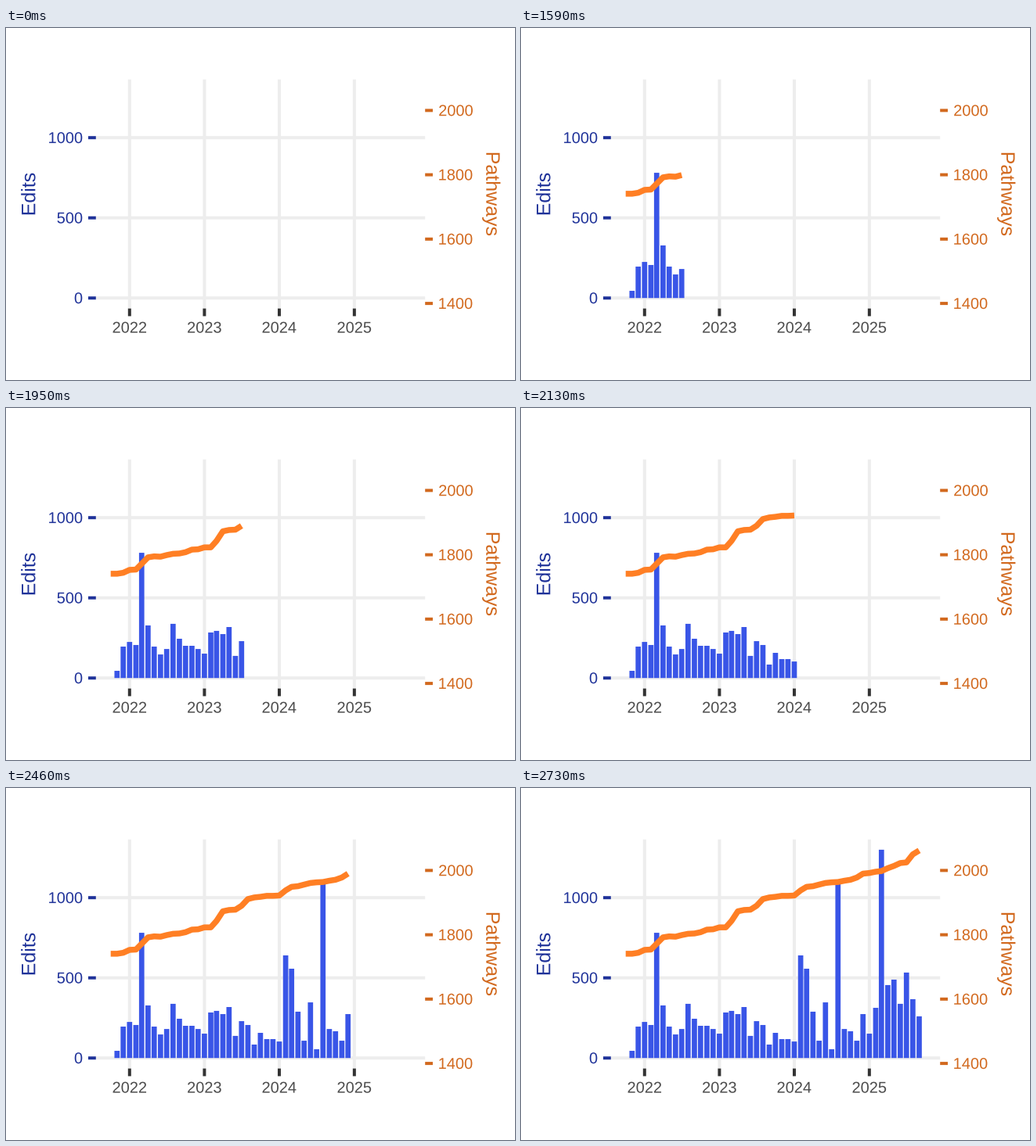
Animation of 650 by 450 pixels, one loop 2.76 s. Source, as a matplotlib script:

```python
import numpy as np
import matplotlib as mpl
import matplotlib.pyplot as plt
from matplotlib.animation import FuncAnimation
from matplotlib.patches import PathPatch, Rectangle
from matplotlib.textpath import TextPath
from matplotlib.transforms import Affine2D

W, H, DPI = 650, 450, 100
PX = 72 / DPI                       # points per pixel
STEP_MS, FRAMES, HOLD = 30, 92, 45  # empty chart is held for HOLD frames
LEFT, RIGHT, TOP, BOTTOM = 114.8, 535.2, 65.8, 358.6
TICK = 9.8

GRID, DARK, GREY = "#ededed", "#333333", "#4d4d4d"
BAR, BAR_AXIS = "#3955e7", "#1f3299"
LINE, LINE_AXIS = "#ff7f24", "#d2691e"

mpl.rcParams["font.family"] = "Liberation Sans"

# Monthly edits from November 2021, monthly pathway totals from October 2021
edits = [45, 196,
         225, 206, 781, 328, 196, 147, 181, 338, 245, 201, 201, 181,
         152, 284, 294, 274, 318, 138, 230, 206, 84, 157, 118, 118,
         103, 640, 557, 289, 108, 347, 55, 1089, 181, 167, 108, 274,
         152, 313, 1299, 455, 489, 338, 533, 367, 260]
pathways = [1741, 1741, 1744,
            1753, 1754, 1772, 1792, 1795, 1794, 1799, 1803, 1804, 1808, 1816, 1817,
            1823, 1823, 1843, 1873, 1877, 1878, 1890, 1911, 1916, 1918, 1921, 1921,
            1922, 1938, 1949, 1951, 1956, 1961, 1963, 1964, 1968, 1971, 1978, 1990,
            1992, 1996, 1998, 2007, 2014, 2023, 2025, 2050, 2062]


def date_x(dates):
    days = (dates.astype("datetime64[D]") - np.datetime64("2022-01-01")).astype(int)
    return 157.8 + days * 0.2619


def edits_y(n):
    return 345.2 - 0.205 * np.asarray(n)


def pathways_y(n):
    return 352.1 - 0.4112 * (np.asarray(n) - 1400)


fig = plt.figure(figsize=(W / DPI, H / DPI), dpi=DPI, facecolor="white")
ax = fig.add_axes([0, 0, 1, 1])
ax.set_xlim(0, W)
ax.set_ylim(H, 0)
ax.axis("off")


def stroke(xs, ys, color, width, z):
    line, = ax.plot(xs, ys, color=color, lw=width * PX, zorder=z, snap=False,
                    solid_capstyle="butt", solid_joinstyle="round")
    return line


def label(s, x, y, color, size=20, align=0.5, turn=0):
    """Outline text; x is the baseline for turned text, else the aligned edge."""
    path = TextPath((0, 0), s, size=size)
    box = path.get_extents()
    dx = -(box.x0 + align * box.width)
    dy = 0 if turn else -(box.y0 + box.y1) / 2
    place = Affine2D().translate(dx, dy).scale(1, -1).rotate_deg(turn).translate(x, y)
    ax.add_patch(PathPatch(place.transform_path(path), fc=color, lw=0, zorder=1))


for year in range(2022, 2026):
    x = date_x(np.datetime64(f"{year}-01-01"))
    stroke([x, x], [TOP, BOTTOM], GRID, 4, 0)
    stroke([x, x], [BOTTOM, BOTTOM + TICK], DARK, 4, 1)
    label(str(year), x, 382.7, GREY)

for n in (0, 500, 1000):
    y = edits_y(n)
    stroke([LEFT, RIGHT], [y, y], GRID, 4, 0)
    stroke([LEFT - TICK, LEFT], [y, y], BAR_AXIS, 4, 1)
    label(str(n), 97.3, y, BAR_AXIS, align=1)

for n in (1400, 1600, 1800, 2000):
    y = pathways_y(n)
    stroke([RIGHT, RIGHT + TICK], [y, y], LINE_AXIS, 4, 1)
    label(str(n), 553.2, y, LINE_AXIS, align=0)

label("Edits", 37.3, 212, BAR_AXIS, size=25, turn=-90)
label("Pathways", 613.3, 212.5, LINE_AXIS, size=25, turn=90)

month_x = date_x(np.arange("2021-10", "2025-10", dtype="datetime64[M]"))
total_y = pathways_y(pathways)
BAR_W = 6.7
bars = [ax.add_patch(Rectangle((x - BAR_W / 2, edits_y(n)), BAR_W, 0.205 * n,
                               fc=BAR, lw=0, zorder=2, snap=False))
        for x, n in zip(month_x[1:], edits)]
trend = stroke([], [], LINE, 7.5, 3)


def draw(frame):
    shown = max(0, frame - HOLD + 1)
    for i, bar in enumerate(bars):
        bar.set_visible(i < shown)
    end = shown + 1 if shown else 0
    trend.set_data(month_x[:end], total_y[:end])
    return [*bars, trend]


anim = FuncAnimation(fig, draw, frames=FRAMES, interval=STEP_MS,
                     repeat=True, repeat_delay=0, blit=False)
plt.show()
```
